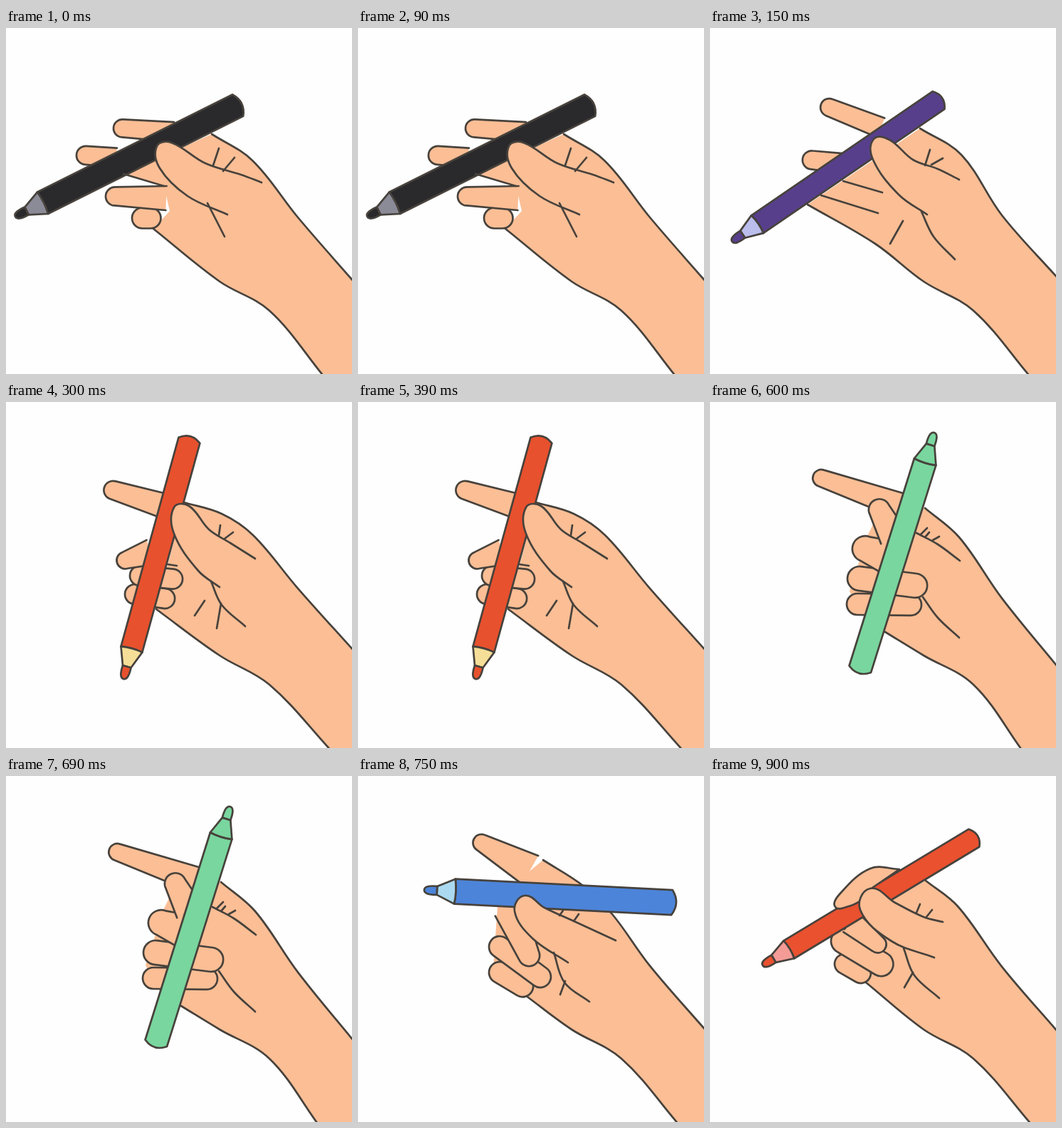
An HTML page that plays this animation: 486x486 px, repeating every 1050 ms.

```html
<!DOCTYPE html>
<html lang="en">
<head>
<meta charset="utf-8">
<title>Hand with pens</title>
<style>
  html, body { margin: 0; width: 100%; height: 100%; overflow: hidden; background: #fefefe; }
  svg { display: block; width: 100%; height: 100%; }
  path { stroke: #47423c; stroke-width: 2.7; stroke-linecap: round; stroke-linejoin: round; }
</style>
</head>
<body>
<svg id="stage" viewBox="0 0 486 486"></svg>
<script>
const POSE_MS = 150;
const SKIN = '#fbbe95';
const stage = document.getElementById('stage');
let layer;

function svgNode(parent, tag, attributes = {}) {
  const node = document.createElementNS('http://www.w3.org/2000/svg', tag);
  for (const name in attributes) node.setAttribute(name, attributes[name]);
  return parent.appendChild(node);
}

const draw = (d, fill, more) => svgNode(layer, 'path', { d, fill, ...more });

// Control point next to a, parallel to the line between its neighbours.
function control(a, from, to, reach) {
  const dx = to[0] - from[0], dy = to[1] - from[1];
  const scale = reach / (2.8 * (Math.hypot(dx, dy) || 1));
  return [a[0] + dx * scale, a[1] + dy * scale];
}

// Smooth curve through "x,y" points; "/" marks a corner.
function smooth(text) {
  let last, d = '';
  for (const piece of text.split('/')) {
    const points = piece.trim().split(' ').map(pair => pair.split(',').map(Number));
    if (last) points.unshift(last);
    else d = 'M' + points[0];
    for (let i = 1; i < points.length; i++) {
      const a = points[i - 1], b = points[i];
      const before = points[i - 2] || a, after = points[i + 1] || b;
      const reach = Math.hypot(b[0] - a[0], b[1] - a[1]);
      d += `C${control(a, before, b, reach)} ${control(b, after, a, reach)} ${b}`;
    }
    last = points[points.length - 1];
  }
  return d;
}

// Local x axis runs from the tip to the far end.
function along(tipX, tipY, endX, endY) {
  const angle = Math.atan2(endY - tipY, endX - tipX) * 180 / Math.PI;
  return {
    length: Math.hypot(endX - tipX, endY - tipY),
    transform: `translate(${tipX} ${tipY}) rotate(${angle})`
  };
}

const lines = (...curves) => curves.forEach(curve => draw(smooth(curve), 'none'));
const fold = curve => draw(smooth(curve), SKIN);

// Hand and forearm: every pose shares the wrist; palm closes the fill without a line.
function arm(top, edgeY, edgeX, heel, palm = '') {
  const wristY = 266 + (edgeY - 354) * 0.6;
  const edge = smooth(`${top} 410,${wristY} 490,${edgeY + 4}/500,500/${edgeX + 3},490/370,397 300,356 ${heel}`);
  draw(edge + (palm && 'L' + palm) + 'Z', SKIN).style.stroke = 'none';
  draw(edge, 'none');
}

function finger(tipX, tipY, baseX, baseY, baseWidth, tipWidth, closed) {
  const { length, transform } = along(tipX, tipY, baseX, baseY);
  const b = baseWidth / 2, r = tipWidth / 2;
  const cap = closed ? `A${b} ${b} 0 0 0 ${length} ${-b}` : '';
  draw(`M${length} ${-b}L${r} ${-r}A${r} ${r} 0 0 0 ${r} ${r}L${length} ${b}${cap}`, SKIN, { transform });
}

const curled = (tipX, tipY, baseX, baseY, width) =>
  finger(tipX, tipY, baseX, baseY, width, width, true);

function pen(tipX, tipY, endX, endY, width, color, coneColor = color) {
  const { length, transform } = along(tipX, tipY, endX, endY);
  const h = width / 2, nib = 18, shoulder = 43, end = length - 6;
  const rim = `Q${shoulder + 3} 0 ${shoulder} ${-h}Z`;
  draw(`M${shoulder} ${-h}H${end}Q${length + 6} 0 ${end} ${h}H${shoulder}${rim}`, color, { transform });
  draw(`M${shoulder} ${-h}L${nib} -6V6L${shoulder} ${h}${rim}`, coneColor, { transform });
  draw(`M${nib} -6Q0 -7 0 0Q0 7 ${nib} 6Z`, color, { transform });
}

const poses = [
  () => {
    arm('289,149 346,186', 354, 444, '207,282', '230,257 222,222 165,205');
    finger(151, 140, 235, 146, 28, 25);
    finger(99, 178, 155, 182, 27, 26);
    curled(177, 267, 203, 267, 29);
    finger(140, 236, 225, 239, 34, 26);
    pen(13, 265, 331, 106, 34, '#2a292b', '#8b8a97');
    fold('311,262 255,236 216,197 212,166 232,161 280,190 330,206 359,217');
    lines('165,205 222,222', '291,193 299,169', '305,201 321,182', '283,246 307,293');
  },
  () => {
    arm('295,141 353,178', 349, 447, '232,303 137,248');
    finger(156, 107, 240, 140, 29, 25);
    finger(130, 184, 185, 190, 28, 26);
    lines('187,215 242,231', '156,235 236,260', '271,271 253,303');
    pen(31, 300, 326, 98, 30, '#573f8c', '#bbbdec');
    fold('305,262 265,234 229,185 230,156 252,157 285,185 320,198 350,213');
    lines('302,193 309,171', '311,192 327,183', '297,258 314,293 344,325');
  },
  () => {
    arm('250,141 303,157 347,187', 347, 454, '211,291');
    finger(138, 120, 216, 144, 34, 26);
    curled(237, 278, 181, 270, 28);
    curled(248, 250, 188, 244, 28);
    finger(156, 226, 203, 211, 36, 24);
    lines('227,228 240,230');
    pen(165, 389, 259, 48, 31, '#e8512d', '#f5de97');
    fold('300,260 270,237 236,185 236,148 257,146 285,179 315,198 350,220');
    lines('299,187 301,173', '307,192 319,183', '288,252 303,285 336,315', '302,283 296,318', '279,279 265,300');
  },
  () => {
    arm('243,147 310,164 358,197', 354, 438, '238,315', '205,290 206,222 228,178');
    finger(138, 134, 236, 162, 33, 28);
    curled(268, 305, 210, 290, 27);
    curled(297, 290, 207, 253, 30);
    finger(298, 264, 228, 226, 38, 22);
    finger(234, 146, 262, 195, 52, 26);
    lines('255,224 297,263 318,295 352,331', '318,296 313,327');
    pen(462, 217, 108, 202, 32, '#fdf67d');
  },
  () => {
    arm('302,149 350,190', 370, 436, '246,323', '218,305 196,266 222,186 240,150');
    finger(145, 103, 265, 145, 36, 24);
    curled(297, 285, 207, 284, 30);
    curled(305, 260, 210, 248, 34);
    finger(201, 200, 250, 218, 48, 36);
    finger(231, 138, 258, 190, 40, 30);
    lines('290,184 320,200 351,223', '296,186 305,177', '302,190 308,183', '313,194 322,189', '299,274 320,303 350,331');
    pen(315, 43, 209, 381, 32, '#79d69e');
  },
  () => {
    arm('260,118 316,154 357,194', 355, 448, '235,308', '190,270 196,183 225,147');
    finger(163, 88, 242, 132, 46, 24);
    curled(244, 303, 199, 276, 30);
    curled(268, 291, 199, 240, 30);
    finger(246, 266, 213, 188, 44, 30);
    pen(93, 160, 447, 178, 35, '#4c84d9', '#abdaf0');
    fold('295,262 245,228 220,190 234,168 262,185 310,207 362,231');
    lines('283,196 288,189', '303,204 310,194', '275,248 290,290 325,317', '291,288 284,307');
  },
  () => {
    arm('303,147 348,183', 357, 449, '219,290', '180,250 172,225 230,190');
    curled(224, 284, 189, 264, 28);
    curled(255, 273, 187, 232, 34);
    finger(245, 244, 198, 206, 34, 24);
    pen(74, 266, 376, 84, 29, '#e9512f', '#f49b96');
    fold('228,157/266,131/225,130 182,166 176,184 195,183 211,176');
    fold('315,255 255,232 211,188 225,158 260,178 300,198 327,205');
    lines('290,192 295,180', '304,198 312,188', '272,242 287,280 322,312', '285,276 273,297');
  }
];

const groups = poses.map(drawPose => {
  layer = svgNode(stage, 'g');
  drawPose();
  return layer;
});

function tick() {
  const current = Math.floor(performance.now() / POSE_MS) % groups.length;
  groups.forEach((group, i) => group.style.display = i === current ? '' : 'none');
  requestAnimationFrame(tick);
}
tick();
</script>
</body>
</html>
```
